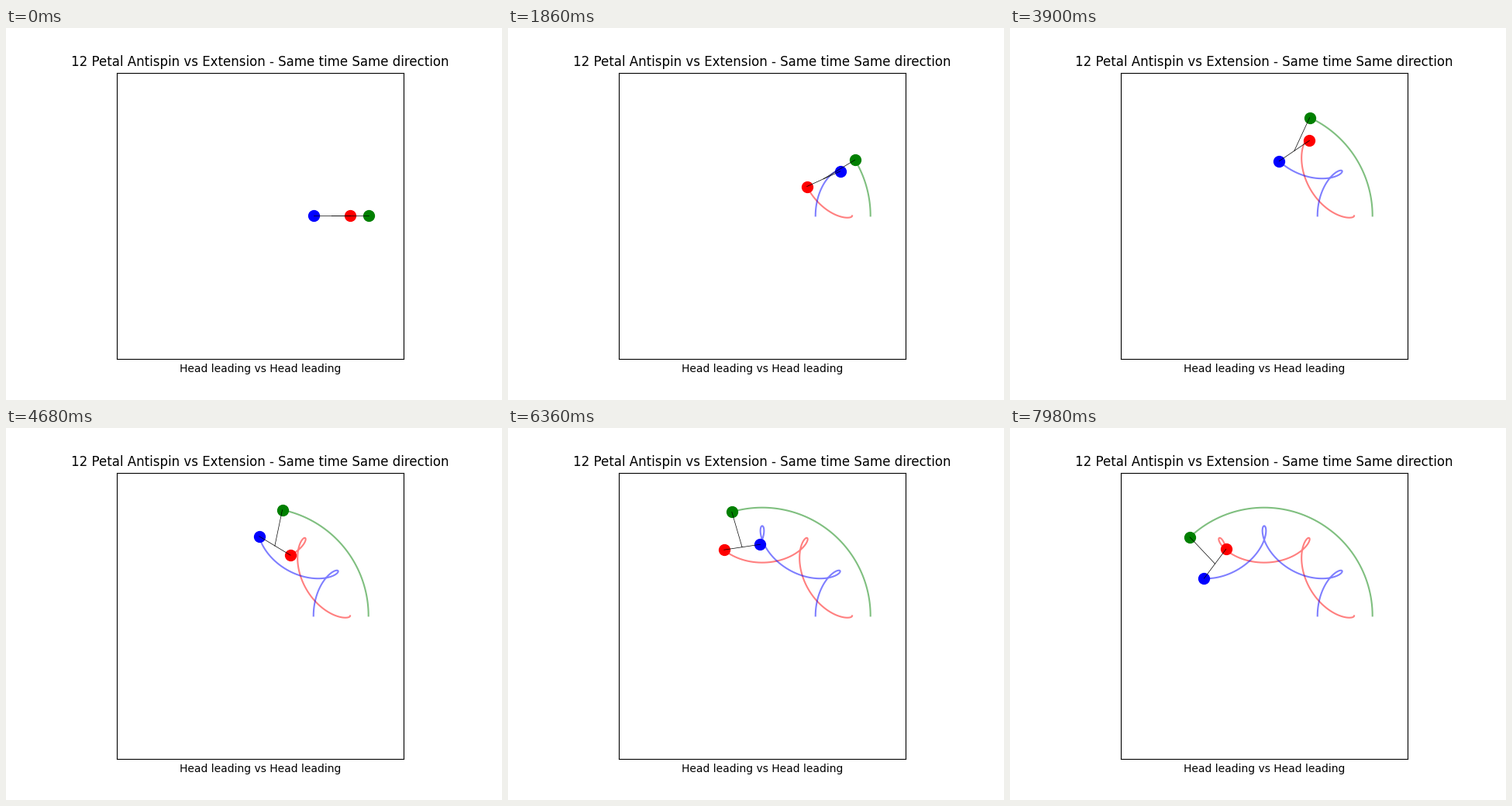
A matplotlib script that plays this animation: 640 by 480 pixels, repeating every 8 s.

```python
import numpy as np
import matplotlib.pyplot as plt
from matplotlib.animation import FuncAnimation

TICK = 20        # ms per drawn frame
HOLD = 3         # drawn frames per pose
LOOP = 8000      # ms
ARM = 1.0
PROP = 0.512     # length of either prop
SPIN = -5        # staff turns per arm turn


def polar(radius, angle):
    return radius * np.array([np.cos(angle), np.sin(angle)])


theta = np.linspace(0, 2 * np.pi, 360)
hand = polar(ARM, theta)
staff = polar(PROP / 2, SPIN * theta)
paths = {
    "red": hand + staff,
    "blue": hand - staff,
    "green": polar(ARM + PROP, theta),
}

fig, ax = plt.subplots(figsize=(6.4, 4.8), dpi=100)
ax.set_aspect("equal")
ax.set(xlim=(-2, 2), ylim=(-2, 2), xticks=[], yticks=[])
ax.set_title("12 Petal Antispin vs Extension - Same time Same direction")
ax.set_xlabel("Head leading vs Head leading")

trails = {c: ax.plot([], [], color=c, alpha=0.5, lw=1.5)[0] for c in paths}
heads = {c: ax.plot([], [], "o", color=c, ms=10)[0] for c in paths}
rods = {c: ax.plot([], [], color="black", lw=0.5)[0] for c in paths}


def draw(frame):
    i = frame // HOLD
    for c, path in paths.items():
        trails[c].set_data(*path[:, :i + 1])
        heads[c].set_data(*path[:, i:i + 1])
        rods[c].set_data(*np.column_stack([hand[:, i], path[:, i]]))
    return [*trails.values(), *heads.values(), *rods.values()]


anim = FuncAnimation(fig, draw, frames=LOOP // TICK, interval=TICK,
                     init_func=lambda: draw(0), repeat=True,
                     repeat_delay=0, blit=False)
plt.show()
```
